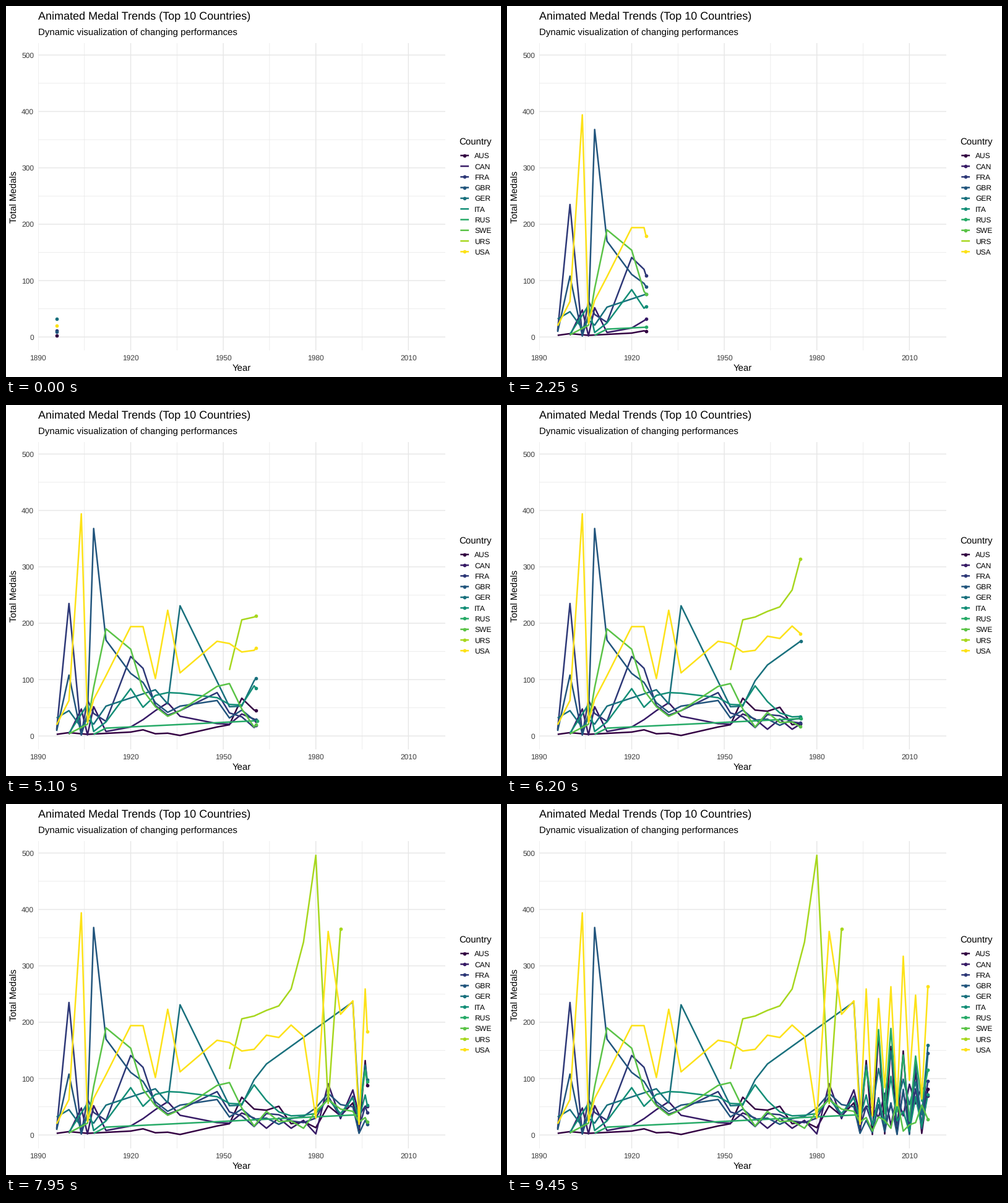
Animation, 800 px wide and 600 px high, one loop 10000 ms. Source, as a matplotlib script:

```python
import numpy as np
import matplotlib.pyplot as plt
from matplotlib.animation import FuncAnimation

W, H, DPI = 800, 600, 100
PX = 72 / DPI                      # points per pixel
FRAMES, LAST = 200, 189            # the last pose is held to the end
LEFT, RIGHT, TOP, BOTTOM = 51.9, 710.2, 60.4, 557.0
FIRST_YEAR, SPAN = 1896, 120

plt.rcParams["font.family"] = "Liberation Sans"
plt.rcParams["text.hinting"] = "none"

YEARS = np.array([1896, 1900, 1904, 1906, 1908, 1912, *range(1920, 1937, 4),
                  *range(1948, 1993, 4), *range(1994, 2017, 2)])
KEYS = np.round((YEARS - FIRST_YEAR) / SPAN * LAST)
NA = np.nan


def tone(color):
    """Darken a hex colour with a display gamma curve."""
    rgb = [int(color[i:i + 2], 16) / 255 for i in (1, 3, 5)]
    return tuple(v ** 1.22 for v in rgb)


GRID, TICK = tone("#ebebeb"), tone("#4d4d4d")

fig = plt.figure(figsize=(W / DPI, H / DPI), dpi=DPI, facecolor="white")
page = fig.add_axes([0, 0, 1, 1])
page.set(xlim=(0, W), ylim=(H, 0))
page.axis("off")
panel = fig.add_axes([LEFT / W, 1 - BOTTOM / H, (RIGHT - LEFT) / W, (BOTTOM - TOP) / H])
panel.set(xlim=(1890, 2022), ylim=(-23.75, 520.75))
panel.axis("off")


def label(x, y, text, size, color="black", **kw):
    kw.setdefault("va", "baseline")
    return page.text(x, y, text, fontsize=size * PX, color=color, **kw)


def to_x(year):
    return LEFT + (year - 1890) / 132 * (RIGHT - LEFT)


def to_y(value):
    return BOTTOM - (value + 23.75) / 544.5 * (BOTTOM - TOP)


def draw_grid():
    for start, width in ((0, 1.45), (1, 0.73)):
        z = 1 - 0.5 * start
        for v in range(50 * start, 501, 100):
            panel.axhline(v, color=GRID, lw=width * PX, zorder=z, snap=False)
        for yr in range(1890 + 15 * start, 2022, 30):
            panel.axvline(yr, color=GRID, lw=width * PX, zorder=z, snap=False)
    for v in range(0, 501, 100):
        label(45.2, to_y(v) + 4.3, v, 12, TICK, ha="right")
    for yr in range(1890, 2022, 30):
        label(to_x(yr), 573.2, yr, 12, TICK, ha="center")


def draw_titles():
    label(LEFT, 21.2, "Animated Medal Trends (Top 10 Countries)", 18)
    label(LEFT, 47.2, "Dynamic visualization of changing performances", 15)
    label((LEFT + RIGHT) / 2, 590.2, "Year", 15, ha="center")
    label(18.2, (TOP + BOTTOM) / 2, "Total Medals", 15, rotation=90,
          ha="right", va="center", rotation_mode="default").set_x(20.6)
    label(732.4, 224.2, "Country", 15)


def dot(ax, color, z):
    return ax.plot([], [], "o", ms=5.7 * PX, mew=0, color=color, zorder=z)[0]


class Series:
    count = 0

    def __init__(self, name, color, values):
        values = np.array(values, float)
        has = ~np.isnan(values)
        self.keys, self.years, self.values = KEYS[has], YEARS[has], values[has]
        color = tone(color)
        self.line, = panel.plot([], [], color=color, lw=2.5 * PX, zorder=2,
                                solid_capstyle="butt", solid_joinstyle="round")
        self.tip = dot(panel, color, 3)
        self.legend_y = 241.8 + 17.28 * Series.count
        page.plot([734.3, 748.1], [self.legend_y] * 2, color=color, lw=2.5 * PX,
                  solid_capstyle="butt", snap=False)
        self.legend_dot = dot(page, color, 3)
        label(757, self.legend_y + 4.4, name, 12)
        Series.count += 1

    def show(self, t):
        if t < self.keys[0]:
            for art in (self.line, self.tip, self.legend_dot):
                art.set_data([], [])
            return
        x = np.interp(t, self.keys, self.years)
        y = np.interp(t, self.keys, self.values)
        past = self.keys < t
        self.line.set_data(np.append(self.years[past], x),
                           np.append(self.values[past], y))
        self.tip.set_data([x], [y])
        self.legend_dot.set_data([741.2], [self.legend_y])


draw_grid()
draw_titles()

aus = Series("AUS", "#440154", [
    3, 6, 4, 3, NA, NA, 7, 11, 4, 5, 1,
    16, 20, 67, 46, 44, 51, 20, 24, 13, 52, 34, 57,
    4, 132, 1, 183, 2, 157, 2, 149, 3, 114, 3, 82])
can = Series("CAN", "#482878", [
    NA, 3, 48, 2, 52, 8, 16, 29, 45, 59, 35,
    22, 21, 39, 30, 12, 30, 12, 26, 2, 91, 29, 80,
    35, 51, 49, 31, 74, 17, 69, 34, 90, 55, 86, 69])
fra = Series("FRA", "#3E4A89", [
    11, 235, 2, 64, 40, 26, 141, 120, 54, 37, 45,
    77, 41, 34, 15, 38, 36, 25, 22, 30, 69, 31, 69,
    12, 51, 18, 66, 15, 53, 15, 77, 14, 82, 18, 96])
gbr = Series("GBR", "#31688E", [
    9, 108, 2, 39, 368, 170, 111, 95, 59, 42, 53,
    63, 32, 46, 28, 30, 19, 29, 33, 48, 74, 54, 50,
    3, 26, 4, 54, 6, 57, 1, 81, 1, 126, 11, 145])
ger = Series("GER", "#26828E", [
    32, 45, 15, 30, 21, 53, NA, NA, 82, 57, 231,
    NA, 52, 53, 98, 126, *[NA] * 6, 236,
    40, 124, 47, 118, 61, 149, 54, 99, 54, 94, 36, 159])
ita = Series("ITA", "#1F9E89", [
    NA, 5, NA, 56, 8, 25, 84, 51, 72, 77, 76,
    68, 56, 55, 89, 61, 41, 34, 35, 38, 64, 38, 66,
    29, 71, 17, 65, 20, 104, 25, 42, 6, 68, 14, 72])
rus = Series("RUS", "#35B779", [
    *[NA] * 4, 3, 14, *[NA] * 17,
    36, 115, 54, 187, 38, 189, 41, 142, 25, 140, 60, 115])
swe = Series("SWE", "#6DCD59", [
    NA, 4, NA, 21, 86, 190, 154, 81, 52, 35, 45,
    88, 93, 48, 16, 42, 24, 25, 12, 42, 63, 46, 42,
    23, 31, 7, 32, 26, 12, 64, 7, 18, 22, 53, 28])
urs = Series("URS", "#B4DE2C", [
    *[NA] * 12, 117, 206, 211, 221, 229, 259, 342, 496, 56, 366, *[NA] * 13])
usa = Series("USA", "#FDE725", [
    20, 63, 394, 24, 65, 107, 194, 194, 102, 223, 112,
    168, 164, 149, 152, 177, 173, 195, 175, 30, 361, 214, 238,
    19, 259, 34, 242, 84, 263, 52, 317, 97, 248, 64, 264])
ALL = (aus, can, fra, gbr, ger, ita, rus, swe, urs, usa)


def update(i):
    for s in ALL:
        s.show(min(i, LAST))
    return []


anim = FuncAnimation(fig, update, frames=FRAMES, interval=50,
                     repeat=True, repeat_delay=0, init_func=lambda: update(0))
plt.show()
```
